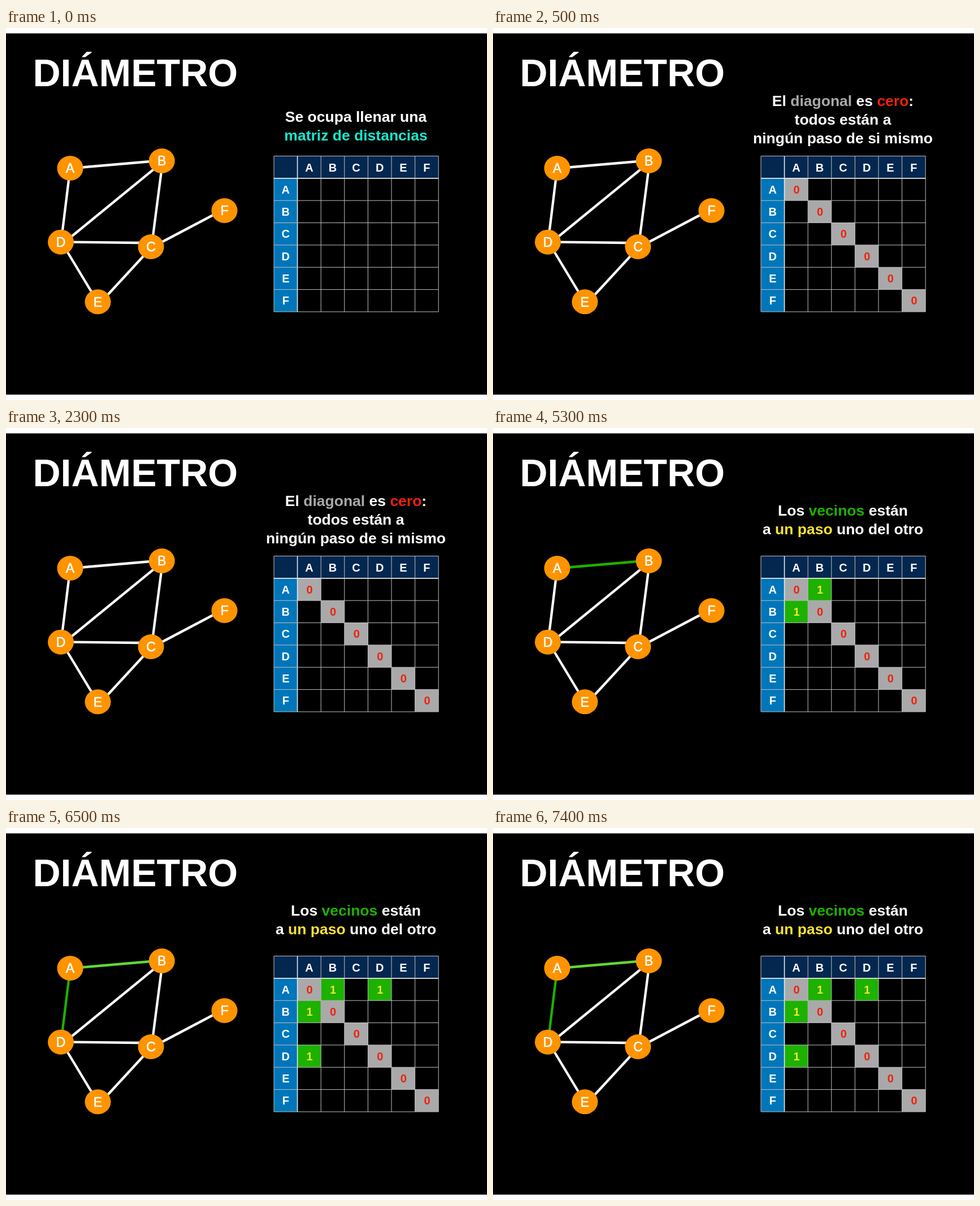
An HTML page for the animation above (8000 ms loop, 851 by 658 pixels).

```html
<!DOCTYPE html>
<html lang="es">
<head>
<meta charset="utf-8">
<title>Diámetro</title>
<style>
  html, body { margin: 0; width: 100%; height: 100%; overflow: hidden; background: #fff; }
  svg { display: block; }
  text { font: bold 20px "Liberation Sans", Arial, sans-serif; fill: #fff; text-anchor: middle; white-space: pre; }
  .title { font-size: 68px; text-anchor: start; }
  .caption { font-size: 26.5px; }
  .node { font-size: 23px; font-weight: normal; stroke: #fff; stroke-width: .6; }
</style>
</head>
<body>
<svg id="stage" width="851" height="658" viewBox="0 0 851 658"></svg>
<script>
const RED = '#ee220c', GREEN = '#1db100', LIME = '#61d836', GRAY = '#a9a9a9',
      YELLOW = '#fae232', TEAL = '#16e7cf', ORANGE = '#ff9300', NAVY = '#04274f', BLUE = '#0076ba';
const LETTERS = [...'ABCDEF'];
const LOOP = 8000;

const nodes = {
  A: [113.5, 248], B: [275.7, 235], C: [256.5, 387],
  D: [97, 378.7], E: [162.5, 484.3], F: [386.5, 323]
};
const edges = {
  AB: [134, 246.5, 256, 236], AD: [111.2, 267, 100, 358], BD: [263, 248.5, 115, 369.5],
  BC: [274.8, 254, 260, 368], CD: [236, 380, 117, 378.6], CE: [244.5, 402, 179, 473],
  CF: [275, 379, 368, 330], DE: [108, 395, 152, 468]
};

// Caption lines are lists of [text, colour] runs; links are highlighted edges.
const neighbours = { top: 155, lines: [
  [['Los '], ['vecinos', GREEN], [' están']],
  [['a '], ['un paso', YELLOW], [' uno del otro']]
] };
const steps = [
  { at: 0, top: 166, diagonal: false, links: {},
    lines: [[['Se ocupa llenar una']], [['matriz de distancias', TEAL]]] },
  { at: 500, top: 138, diagonal: true, links: {},
    lines: [[['El '], ['diagonal', GRAY], [' es '], ['cero', RED], [':']],
            [['todos están a']], [['ningún paso de si mismo']]] },
  { at: 3500, ...neighbours, diagonal: true, links: { AB: GREEN } },
  { at: 6500, ...neighbours, diagonal: true, links: { AB: LIME, AD: GREEN } }
];

const rect = (x, y, w, h, fill) => `<rect x="${x}" y="${y}" width="${w}" height="${h}" fill="${fill}"/>`;
const line = (x1, y1, x2, y2, color, width) =>
  `<line x1="${x1}" y1="${y1}" x2="${x2}" y2="${y2}" stroke="${color}" stroke-width="${width}"/>`;
const text = (x, y, content, cls = '', fill = '#fff') =>
  `<text x="${x}" y="${y}" class="${cls}" style="fill:${fill}">${content}</text>`;

const LEFT = 474, TOP = 226.5, COL = 41.6, ROW = 39.35;
const colX = i => LEFT + i * COL, rowY = i => TOP + i * ROW;

function cell(row, col, value, fill, color) {
  return rect(colX(col), rowY(row), COL, ROW, fill) +
    text(colX(col + .5) + .6, rowY(row + .5) + 7.2, value, '', color);
}

function table({ diagonal, links }) {
  let out = rect(LEFT, TOP, 7 * COL, ROW, NAVY) + rect(LEFT, rowY(1), COL, 6 * ROW, BLUE);
  LETTERS.forEach((letter, i) => {
    out += text(colX(i + 1.5), rowY(.5) + 8, letter) + text(colX(.5), rowY(i + 1.5) + 7.2, letter);
    if (diagonal) out += cell(i + 1, i + 1, 0, GRAY, RED);
  });
  for (const link in links) {
    const [a, b] = [...link].map(letter => LETTERS.indexOf(letter) + 1);
    out += cell(a, b, 1, GREEN, YELLOW) + cell(b, a, 1, GREEN, YELLOW);
  }
  for (let i = 0; i <= 7; i++) {
    const width = i === 1 ? 1.6 : 1, color = i === 1 ? '#e4e8ea' : '#c0c0c0';
    out += line(colX(i), TOP, colX(i), rowY(7), color, width) +
      line(LEFT, rowY(i), colX(7), rowY(i), color, width);
  }
  return out;
}

function graph({ links }) {
  let out = '';
  for (const name in edges) out += line(...edges[name], links[name] || '#fff', 4.3);
  for (const name in nodes) {
    const [x, y] = nodes[name];
    out += `<ellipse cx="${x}" cy="${y}" rx="23" ry="22" fill="${ORANGE}"/>` + text(x, y + 8.3, name, 'node');
  }
  return out;
}

const caption = ({ top, lines }) => lines.map((runs, i) => text(619, top + i * 33,
  runs.map(([words, color = '#fff']) => `<tspan fill="${color}">${words}</tspan>`).join(''), 'caption')).join('');

const stage = document.getElementById('stage');
let shown;

function frame(now) {
  const step = steps.findLast(s => s.at <= now % LOOP);
  if (step !== shown) {
    shown = step;
    stage.innerHTML = rect(0, 9.5, 851, 639, '#000') + text(47.5, 102.5, 'DIÁMETRO', 'title') +
      graph(step) + caption(step) + table(step);
  }
  requestAnimationFrame(frame);
}
frame(performance.now());
</script>
</body>
</html>
```
